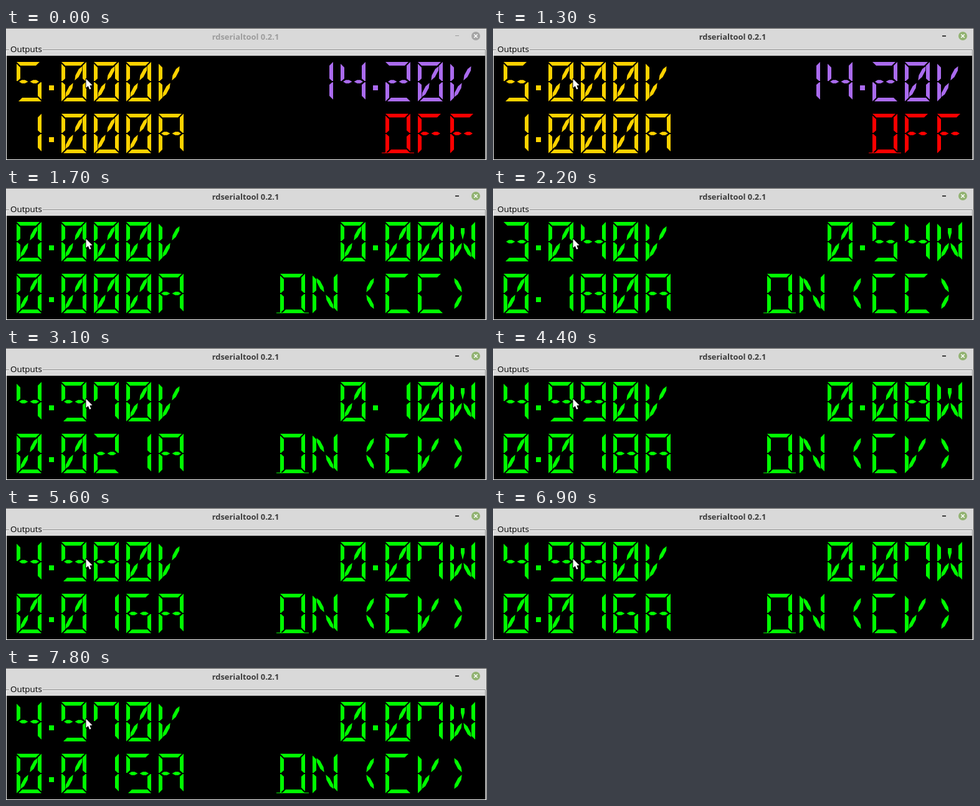
Write an HTML page with a canvas that moves like this. It is 772x214 px and loops after 8000 ms.

```html
<!DOCTYPE html>
<html lang="en">
<head>
<meta charset="utf-8">
<title>rdserialtool</title>
<style>
  html, body { margin: 0; width: 100%; height: 100%; overflow: hidden; background: #d9d9d9; }
  canvas { display: block; }
</style>
</head>
<body>
<canvas id="stage" width="772" height="214"></canvas>
<script>
const ctx = document.getElementById('stage').getContext('2d');
const LOOP = 8000, FOCUS_AT = 1300, ON_AT = 1700, CV_AT = 2400;
const W = 40, H = 64, CELL = 52, PAD = 5, LEFT = 12, RIGHT = 760, ROW1 = 55, ROW2 = 139;
const GREEN = '#00ff00', GOLD = '#ffd200', PURPLE = '#aa6bee', RED = '#ff0000';

// Fourteen-segment display: half the shapes are defined, the rest are turned or mirrored.
const turn = pts => pts.map(([x, y]) => [W - x, H - y]);
const mirror = pts => pts.map(([x, y]) => [W - x, y]);

// A bar between two points that narrows to a tip over the given share of each end.
function leaf(x0, y0, x1, y1, half, taper0, taper1) {
  const dx = x1 - x0, dy = y1 - y0, len = Math.hypot(dx, dy);
  const at = (s, side) => [
    x0 + dx * s - side * half * dy / len,
    y0 + dy * s + side * half * dx / len
  ];
  return [at(0, 0), at(taper0, 1), at(1 - taper1, 1), at(1, 0), at(1 - taper1, -1), at(taper0, -1)];
}

const seg = {
  a: [[0, 0], [37, 0], [31, 6], [6, 6]],
  f: [[0, 3], [6, 9], [6, 27], [1.5, 31], [0, 31]],
  e: [[0, 33], [1.5, 33], [6, 37], [6, 58], [0, 64]],
  g: leaf(4, H / 2, 18.5, H / 2, 2.8, 0.3, 0.35),
  i: leaf(W / 2, 10, W / 2, 29, 3, 0, 0.6),
  k: leaf(33.5, 7, 21.3, 30, 2.9, 0.25, 0.3)
};
seg.d = turn(seg.a);
seg.c = turn(seg.f);
seg.b = turn(seg.e);
seg.G = turn(seg.g);
seg.m = turn(seg.k);
seg.h = mirror(seg.k);
seg.n = turn(seg.h);

const glyphs = {
  0: 'abcdefkm', 1: 'bc', 2: 'abgGed', 3: 'abcdgG', 4: 'fgGbc',
  5: 'afgGcd', 6: 'afedcgG', 7: 'abcf', 8: 'abcdefgG', 9: 'abcdfgG',
  A: 'abcefgG', C: 'adef', F: 'aefgG', N: 'efhnbc', O: 'abcdef',
  V: 'efkm', W: 'bcefimn', '(': 'kn', ')': 'hm'
};

const advance = ch => ch === '.' ? 20 : ch === ' ' ? 13 : CELL;

// Constant current charges the load in a straight line; constant voltage then settles.
function measure(t) {
  const step = t > 2000 && t < 3000 ? 200 : 100;
  const ms = Math.floor(t / step) * step;
  const on = Math.max(0, ms - ON_AT) / 1000;
  const settled = (ms - CV_AT) / 1000;
  const limited = ms < CV_AT;

  const drift = 0.01 * Math.cos((settled - 1.63) * Math.PI / 4.6);
  const volts = limited ? 6.08 * on : 4.98 + drift - 0.8 * Math.exp(-settled / 0.184);
  const decay = 0.13 * Math.exp(-settled / 0.13) + 0.0055 * Math.exp((0.7 - settled) / 1.9);
  const amps = limited ? (on > 0 ? 0.18 : 0) : 0.015 + decay;

  const v = volts.toFixed(2), a = amps.toFixed(3);
  const w = (Math.floor(v * a * 100) / 100).toFixed(2);
  return { v: v + '0V', a: a + 'A', w: w + 'W', mode: limited ? 'ON (CC)' : 'ON (CV)' };
}

function fillPath(pts, x, y) {
  ctx.beginPath();
  pts.forEach(([px, py]) => ctx.lineTo(x + px, y + py));
  ctx.closePath();
  ctx.fill();
}

function rect(color, x, y, w, h) {
  ctx.fillStyle = color;
  ctx.fillRect(x, y, w, h);
}

function drawText(str, x, y, color) {
  ctx.fillStyle = color;
  for (const ch of str) {
    if (ch === '.') ctx.fillRect(x + 5, y + 38, 8, 8);
    else for (const s of glyphs[ch] || '') fillPath(seg[s], x + PAD, y);
    x += advance(ch);
  }
}

function drawRight(str, y, color, underline) {
  const x = RIGHT - [...str].reduce((sum, ch) => sum + advance(ch), 0);
  drawText(str, x, y, color);
  if (underline) ctx.fillRect(x - 1, y + H - 1, CELL, 1);
}

function label(str, x, y, font, color, align) {
  ctx.font = font + ', sans-serif';
  ctx.textAlign = align;
  ctx.fillStyle = color;
  ctx.fillText(str, x, y);
}

function drawTitleBar(active) {
  const ink = active ? '#3c3c3c' : '#9c9c9c';
  rect('#d9d9d9', 0, 0, 772, 214);
  rect('#505050', 0, 0, 772, 1);
  label('rdserialtool 0.2.1', 384.5, 19, '600 12.9px "Noto Sans"', ink, 'center');
  rect(ink, 721, 12, 6, active ? 2 : 1);

  ctx.fillStyle = active ? '#92b372' : '#a5a5a5';
  ctx.beginPath();
  ctx.arc(754, 13, 7, 0, Math.PI * 2);
  ctx.fill();
  ctx.strokeStyle = '#ffffff';
  ctx.lineWidth = 1.5;
  ctx.beginPath();
  for (const side of [-2.7, 2.7]) {
    ctx.moveTo(754 - side, 10.3);
    ctx.lineTo(754 + side, 15.7);
  }
  ctx.stroke();
}

function drawPanel() {
  rect('#828282', 0, 35, 770, 1);
  rect('#ffffff', 0, 36, 770, 1);
  rect('#ffffff', 0, 36, 1, 178);
  rect('#828282', 769, 36, 1, 177);
  rect('#ffffff', 770, 35, 1, 179);
  rect('#505050', 771, 0, 1, 214);
  rect('#ffffff', 0, 213, 771, 1);
  rect('#000000', 1, 45, 768, 168);
  rect('#d9d9d9', 5, 28, 54, 15);
  label('Outputs', 7, 39, '13.4px "Open Sans"', '#000000', 'left');
}

function drawCursor() {
  const arrow = [[0, 0], [0, 14.5], [3.3, 11.6], [5.6, 17], [8, 16], [5.8, 10.7], [10, 10.3]];
  ctx.strokeStyle = '#000000';
  ctx.lineWidth = 2;
  ctx.lineJoin = 'round';
  ctx.fillStyle = '#ffffff';
  fillPath(arrow, 128.5, 82.5);
  ctx.stroke();
  fillPath(arrow, 128.5, 82.5);
}

function draw(t) {
  drawTitleBar(t >= FOCUS_AT);
  drawPanel();
  if (t >= ON_AT) {
    const { v, a, w, mode } = measure(t);
    drawText(v, LEFT, ROW1, GREEN);
    drawText(a, LEFT, ROW2, GREEN);
    drawRight(w, ROW1, GREEN);
    drawRight(mode, ROW2, GREEN, true);
  } else {
    drawText('5.000V', LEFT, ROW1, GOLD);
    drawText('1.000A', LEFT, ROW2, GOLD);
    drawRight('14.20V', ROW1, PURPLE);
    drawRight('OFF', ROW2, RED, true);
  }
  drawCursor();
}

function tick() {
  draw(performance.now() % LOOP);
  requestAnimationFrame(tick);
}
tick();
</script>
</body>
</html>
```
